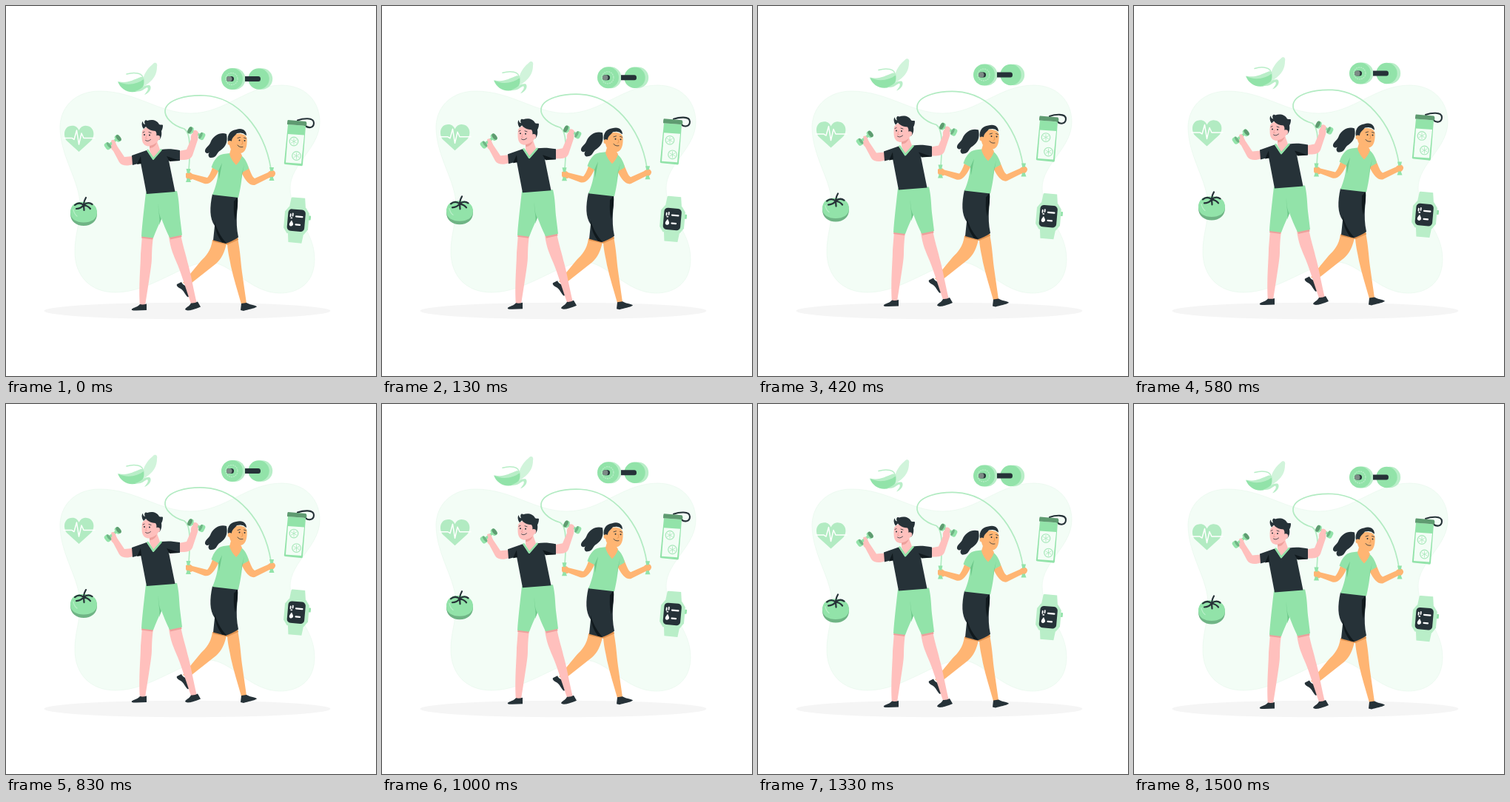
An HTML page for the animation above (1540 ms loop, 500 px wide and 500 px high).

```html
<!DOCTYPE html>
<html lang="en">
<head>
<meta charset="utf-8">
<title>Floating workout</title>
<style>
  html, body { margin: 0; width: 100%; height: 100%; overflow: hidden; background: #fff; }
  svg { display: block; width: 100%; height: 100%; }
  .line { fill: none; stroke-linecap: round; stroke-linejoin: round; }
  .green { fill: #92e3a9; }
  .light { fill: #b9eec8; }
  .pale { fill: #d1f4db; }
  .deep { fill: #5f9b71; }
  .dark { fill: #263238; }
  .black { fill: #10191d; }
  .pink { fill: #ffc0bd; }
  .tan { fill: #ffb573; }
  .white { fill: #fff; }
</style>
</head>
<body>
<svg viewBox="0 0 500 500">
  <defs>
    <g id="weight">
      <path class="line" d="M-8 0H8" stroke="#92e3a9" stroke-width="3.6"/>
      <rect class="green" x="-12" y="-5" width="7" height="10" rx="3.2"/>
      <ellipse class="deep" cx="-9.5" rx="2.6" ry="4.8"/>
      <rect class="green" x="5" y="-5" width="7.500" height="10" rx="3.2"/>
      <ellipse fill="#6fb485" cx="6.800" rx="1.800" ry="4.600"/>
    </g>
    <path id="grip" class="green" d="M-3-9H3L2-5V5L3.500 9H-3.500L-2 5V-5Z"/>
    <g id="lemon" class="line" stroke="#a9e8bb">
      <circle r="5.800" stroke-width="1.200"/>
      <path d="M0-4V4M-3.500-2L3.500 2M-3.500 2L3.500-2" stroke-width=".8"/>
    </g>
  </defs>

  <path fill="#f3fdf6" stroke="#e6f7eb" stroke-width=".6" d="M73 163C74 133 97 115 126 115C176 115 206 145 250 145C296 145 326 107 372 107C404 107 424 128 424 157C424 192 384 214 384 246C384 284 417 302 417 342C417 372 398 388 370 388C330 388 304 346 274 346C240 346 196 387 148 387C113 387 93 364 93 332C93 308 100 296 100 270C100 236 73 204 73 163Z"/>
  <ellipse fill="#f5f5f5" cx="245" cy="412" rx="193.500" ry="11.300"/>

  <g id="float">
    <!-- banana -->
    <path class="pale" d="M185 105C184 92 193 83 200 77C203 76 205 78 204 82C204 92 200 98 193 104L176 116Z"/>
    <path class="light" d="M152 102C164 105 171 100 182 96C189 95 188 103 181 108C172 112 159 111 152 102Z"/>
    <path class="green" d="M151 102C164 109 178 105 186 99C188 107 184 113 178 115C166 119 155 113 151 102Z"/>
    <path class="light" d="M174 115C184 113 185 106 194 107C198 110 194 118 187 120C191 115 193 112 191 110C187 111 184 117 174 115Z"/>
    <path class="line" d="M163 92C173 89 186 90 185 99" stroke="#b9eec8" stroke-width="1.5"/>

    <!-- big dumbbell -->
    <circle class="light" cx="309" cy="98.5" r="14.5"/>
    <circle class="green" cx="305.5" cy="98.5" r="14.5"/>
    <circle class="line" cx="305" cy="98.5" r="8" stroke="#b9eec8" stroke-width="1.3" stroke-dasharray="1 2"/>
    <rect x="298" y="95" width="10" height="7" rx="3.5" class="dark"/>
    <rect x="298" y="95" width="7.5" height="7" rx="3.5" fill="#7d8a86"/>
    <circle class="light" cx="346" cy="98.5" r="14.2"/>
    <circle class="green" cx="341.5" cy="98.5" r="14.2"/>
    <path class="dark" d="M323 95H341Q344 95 344 98.5Q344 102 341 102H323Z"/>

    <!-- heart -->
    <path fill="#b2ebc2" d="M98.500 197L82 182C77 175 78 163 88 162C93 161 97 164 98.500 168C101 163 105 161 109 162C119 163 121 175 115 182Z"/>
    <path class="line" d="M78 178.500H89L92 180.500L95.500 168L98.500 187L102 172L105 178.500H120" stroke="#fff" stroke-width="1.5"/>

    <!-- tomato -->
    <path fill="#6fb485" d="M87 281C87 269 96 265 105 266C115 265 123 270 123 281C123 291 115 297 105 297C95 297 87 291 87 281Z"/>
    <path class="green" d="M87 279C87 268 96 264 105 265C115 264 123 269 123 279C123 288 115 292.500 105 292.500C95 292.500 87 288 87 279Z"/>
    <path class="line" d="M91 275Q92 281 96 284" stroke="#b9eec8" stroke-width="1.3"/>
    <path class="line" d="M105 268Q105.500 263 108 259M93 269Q99 264 105 269Q111 264 116.500 268M95 274Q101 274 105 269Q111 270 114 274M105 269L105.500 276" stroke="#263238" stroke-width="2.200"/>

    <!-- bottle -->
    <path class="line" d="M394 154.500C401 152 416 150 416 158C416 165 408 166 404 161" stroke="#263238" stroke-width="2.100"/>
    <path class="green" d="M381 160L405 162L401 214Q401 217 398 216L378 214Q375 214 376 211Z"/>
    <path fill="#f3fdf6" d="M381 173L403 174.500L399 213L378 211.500Z"/>
    <path class="deep" d="M381 154L405 156Q407 157 406 162L380 160Q380 155 381 154Z"/>
    <use href="#lemon" x="389" y="183"/>
    <use href="#lemon" x="392.500" y="202.500"/>

    <!-- watch -->
    <g transform="rotate(5 393 290)">
      <path class="light" d="M383 260Q383 259 385 259H401.500L404 276H381ZM382 304H404L402 320H384Z"/>
      <rect x="408" y="282" width="3.500" height="6" rx="1" class="green"/>
      <path class="light" d="M381 272H404L409 279V301L404 308H381L376 301V279Z"/>
      <rect x="380.500" y="275" width="23.500" height="29.500" rx="5" class="dark"/>
      <path class="white" d="M386 290C384 293 382.500 295 383.500 297C385 299 388 298 388.500 296C389 294 387 292 386 290Z"/>
      <path class="line" d="M391.500 284.500H400M392 295.500H397.500" stroke="#fff" stroke-width="2.200"/>
      <path class="line" d="M384 282V285M387 281V284M385 287H386" stroke="#fff" stroke-width="1.800"/>
    </g>

    <!-- rope -->
    <path class="line" d="M247 222C249 195 250 172 241 166C223 161 214 149 215 141C217 126 245 120 268 121C312 123 349 165 358 220" stroke="#b2ebc2" stroke-width="1.700"/>

    <!-- woman -->
    <path class="dark" d="M298 173C290 170 280 175 276.500 184C275 189 268 192 269 197C271 200 273 199 275 198C272 201 274 206 278 205C286 204 284 198 290 195C297 190 300 184 298 173Z"/>
    <path class="tan" d="M279 316C277 331 270 338 263 345L239 374L246 378L284 348C291 342 296 332 298 320Z"/>
    <path class="dark" d="M237 373L231 376C230 378 232 380 236 382C241 385 242 391 246 393.500C248.500 392 247.500 386 247 379C243 379 239 377 237 373Z"/>
    <path class="tan" d="M299 319L313 313C317 335 317 345 319 360L325 402L318 403C313 385 308 370 304 352C302 340 299 330 299 319Z"/>
    <path fill="#e0924f" d="M279 316L297 320L313 313L314 316L299 322.500L280 318.500Z"/>
    <path class="dark" d="M318 402L317 411L321 412C327 410 335 409 339 406.500C338 404 332 405 325 401Z"/>
    <path class="dark" d="M279 254L313 258C314 272 309 290 314 312.500C309 316 303 319 297 321L280 316.500L282 297C275 287 275 272 279 254Z"/>
    <path class="black" d="M308 264L313 258C314 272 311 280 310 290C307 280 308 272 308 264ZM282 291C285 303 291 313 298 320.500L292 319.500C286 311 282 302 282 291Z"/>
    <path class="tan" d="M280 215C278 222 275 229 272 232L252 227C247 222 243 225 243 230C243 235 249 236 252 234L268 240C276 242 282 234 288 221Z"/>
    <path class="tan" d="M319 219L327 216C331 226 333 231 336 233L354 225C359 220 364 222 364 227C363 231 359 233 356 232L336 242C329 243 324 236 319 227Z"/>
    <use href="#grip" x="246.500" y="229"/>
    <use href="#grip" x="359" y="227"/>
    <path class="tan" d="M243 226Q248 225 251 228L249 233Q244 234 243 230ZM356 224Q362 221 364 226L361 231L356 231Z"/>
    <path class="green" d="M277.500 218C281 208 286 201 294 200L302 199L318 202C324 207 327 214 328 220L319 225C319 236 316 250 314 259L279 255C284 243 286 234 287 223Z"/>
    <path fill="#6fc98b" d="M287 223L292 212L288 234ZM319 225L322 214L317 238Z"/>
    <path class="tan" d="M304 193L302 200Q304 208 311 215Q317 209 319 202L315 195Z"/>
    <path class="tan" d="M301 181C301 171 324 169 325.500 179C326 187 325 196 319 198.500C311 201 303 196 302 188Z"/>
    <path class="dark" d="M301 187C297 176 302 168 311 167C320 164 325 169 325 175C322 174 322 172 319 172C316 171 314 172 312 172C308 177 306 177 305 182L303 187Z"/>
    <circle class="tan" cx="302.500" cy="185" r="3"/>
    <circle class="white" cx="301" cy="189.500" r="1"/>
    <circle class="dark" cx="315.500" cy="181.500" r="1"/>
    <circle class="dark" cx="322.500" cy="182" r="1"/>
    <path class="line" d="M313 178.500L316.500 177.500M321.500 178L324.500 179M313 188Q315 191.500 320 190.500" stroke="#263238" stroke-width=".8"/>
    <path class="line" d="M319 182L320 186L318 187" stroke="#e0924f" stroke-width=".8"/>

    <!-- man -->
    <path class="pink" d="M184 310L199 312C196 333 198 340 196 352C194 367 191 385 188 405L181 405C179 380 182 350 182 335Z"/>
    <path class="pink" d="M220 311L236 308C239 325 243 335 245 345C250 362 253 382 258 402L251 405C244 385 238 365 232 350C227 338 222 328 220 311Z"/>
    <path fill="#eda09c" d="M184 310L199 312L198 315.500L183 313.500ZM221 312L237 309L237.500 312L222 315.500Z"/>
    <path class="dark" d="M181 403C178 407 173 407 170 409.500C169 411.500 172 411.500 176 411.500L190 411L190 402.500Q185 404 181 403ZM250 401.500C248 406 243 407 242 410C244 412.500 250 412 263 406.500L259 399.500Q255 402 250 401.500Z"/>
    <path class="green" d="M189 252L231 250C234 262 234 275 235 285L238 309.500L221 313C216 303 213 295 210 287C206 297 202 305 199 313.500L183 311.500C184 295 187 270 189 252Z"/>
    <path fill="#6fc98b" d="M206 267C206 276 207 283 210 288L207 296C209 286 205 278 206 267Z"/>
    <path class="pink" d="M171 203L160 204L150 189C149 185 143 184 141 188C141 192 143 194 145 196L153 211C157 217 165 216 172 214Z"/>
    <path class="pink" d="M234 196L244 194L250 180C249 175 252 170 256 171C260 173 260 177 259 181L252 202C249 209 241 208 234 208Z"/>
    <path class="dark" d="M190 195L170 202L171 215L182 212L190 254L228.500 251L220 209L235 209V195C225 193 217 193 210 194L199 208Z"/>
    <path class="black" d="M182 203L177 214L183 213ZM217 203L221 210L235 209Z"/>
    <path class="pink" d="M194 184V195L199 207L208 194L204 183Z"/>
    <path class="line" d="M191.500 195L199 206.500L209.500 194.500" stroke="#92e3a9" stroke-width="2.600"/>
    <path class="pink" d="M184 169C183 178 183 187 190 189C197 191 203 187 206 181L207 168C200 162 188 161 184 169Z"/>
    <path fill="#eda09c" d="M194 189Q200 188 204 184Q201 192 194 192Z"/>
    <path class="dark" d="M186 166C183 162 183 157 185 156C185 159 187 160 188 160C186 156 188 153 191 155C197 153 204 154 207 160C209 161 211 160 212 161C212 165 211 167 210 169C211 175 209 179 207 181L204 180C202 176 205 173 202 169C197 169 191 166 189 163Z"/>
    <circle class="pink" cx="205" cy="178" r="3.200"/>
    <circle class="dark" cx="187" cy="174" r="1"/>
    <circle class="dark" cx="194" cy="174.500" r="1"/>
    <path class="line" d="M185 171L187 170M193 170.500L196 171.500M188.500 181.500Q191.500 184 195.500 180.500" stroke="#263238" stroke-width=".8"/>
    <path class="line" d="M190 175L188.500 179H190.500" stroke="#eda09c" stroke-width=".9"/>
    <use href="#weight" transform="translate(144.500 184) rotate(143)"/>
    <use href="#weight" transform="translate(257 172) rotate(27)"/>
    <path class="pink" d="M142 182Q146 179 148 184L150 190L144 189ZM253 169Q257 166 260 171L258 178L252 177Z"/>
  </g>
</svg>
<script>
  const LOOP = 1540, PEAK = 722, RISE = 10;
  const float = document.getElementById('float');

  // Constant-speed rise and fall, turning sharply at both ends.
  const drop = t => {
    const d = Math.abs(t % LOOP - PEAK);
    return RISE * Math.min(d, LOOP - d) / (LOOP / 2);
  };

  const start = performance.now();
  function draw() {
    const t = performance.now() - start;
    float.setAttribute('transform', `translate(0 ${(drop(t) - drop(0)).toFixed(2)})`);
    requestAnimationFrame(draw);
  }
  draw();
</script>
</body>
</html>
```
